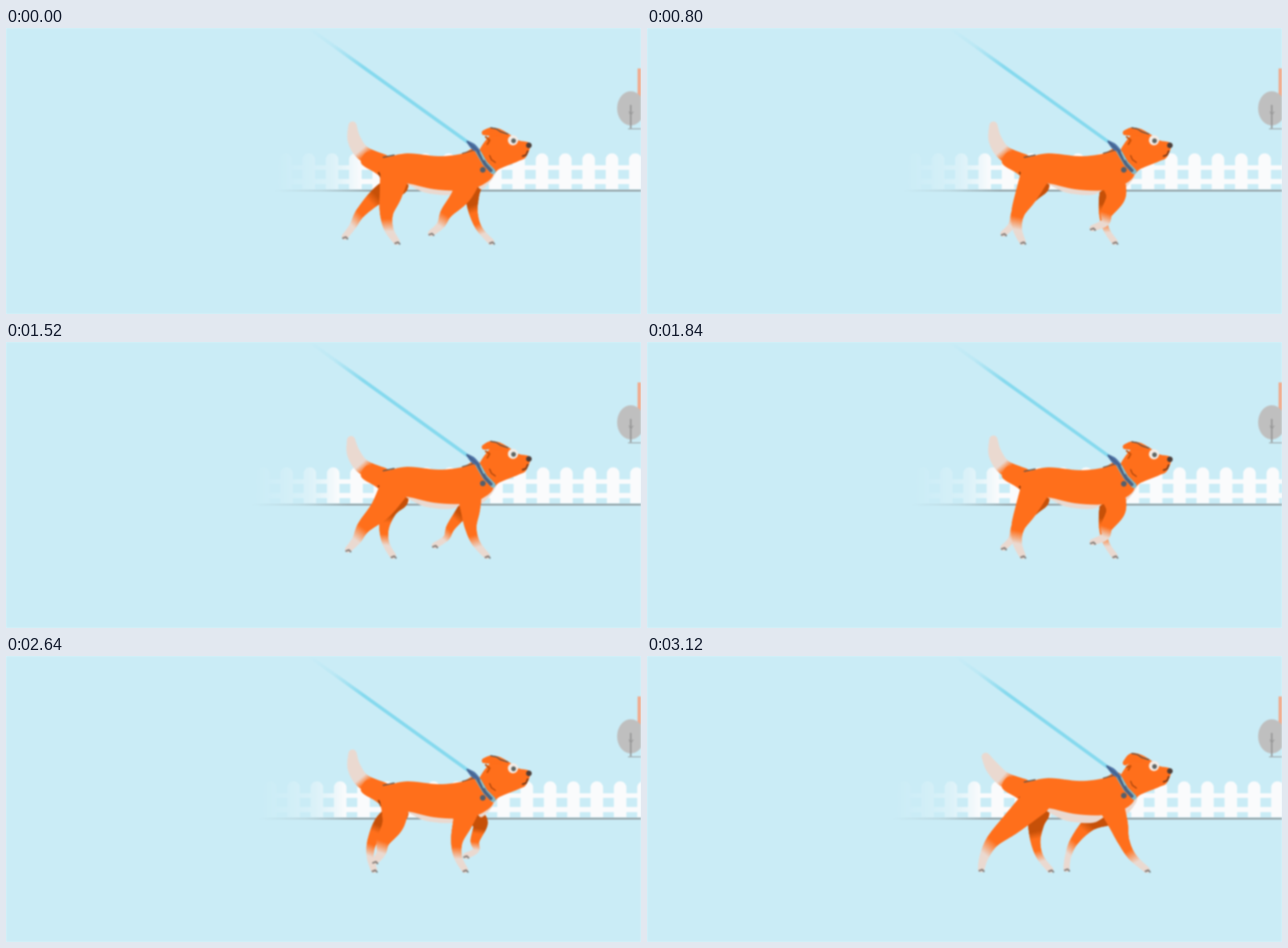
Write an HTML page with a canvas that moves like this. It is 1116 px wide and 502 px high and loops after 3.2 s.

```html
<!DOCTYPE html>
<html lang="en">
<head>
<meta charset="utf-8">
<title>Dog walk</title>
<style>
html, body { margin: 0; width: 100%; height: 100%; overflow: hidden; background: #e0f4fa; }
canvas { display: block; filter: blur(1.7px); }
</style>
</head>
<body>
<canvas id="stage" width="1116" height="502"></canvas>
<script>
const c = document.getElementById('stage').getContext('2d');
const ORANGE = '#ff6f1b', DARK = '#c65008', PALE = '#ead9d0', INK = '#5d5148';
const nearSkin = [[0, ORANGE], [.66, ORANGE], [.84, PALE], [1, PALE]];
const farSkin = [[0, DARK], [.3, DARK], [.43, ORANGE], [.63, ORANGE], [.82, PALE], [1, PALE]];

function fade(x0, y0, x1, y1, stops) {
  const g = c.createLinearGradient(x0, y0, x1, y1);
  for (const [at, colour] of stops) g.addColorStop(at, colour);
  return g;
}

// Closed smooth curve through points
function blob(p, fill) {
  const n = p.length / 2, at = i => [p[(i + n) % n * 2], p[(i + n) % n * 2 + 1]];
  c.beginPath();
  c.moveTo(p[0], p[1]);
  for (let i = 0; i < n; i++) {
    const [a, b, d, e] = [at(i - 1), at(i), at(i + 1), at(i + 2)];
    c.bezierCurveTo(b[0] + (d[0] - a[0]) / 6, b[1] + (d[1] - a[1]) / 6,
      d[0] - (e[0] - b[0]) / 6, d[1] - (e[1] - b[1]) / 6, d[0], d[1]);
  }
  c.fillStyle = fill;
  c.fill();
}

function oval(x, y, rx, ry, fill) {
  c.beginPath();
  c.ellipse(x, y, rx, ry, 0, 0, 7);
  c.fillStyle = fill;
  c.fill();
}

const disc = (x, y, r, fill) => oval(x, y, r, r, fill);

function line(colour, width, ...p) {
  c.beginPath();
  for (let i = 0; i < p.length; i += 2) c.lineTo(p[i], p[i + 1]);
  c.strokeStyle = colour;
  c.lineWidth = width;
  c.lineCap = c.lineJoin = 'round';
  c.stroke();
}

const spline = (a, b, d, e, u) =>
  b + u * (d - a + u * (2 * a - 5 * b + 4 * d - e + u * (3 * (b - d) + e - a))) / 2;

// Tapered limb along a smooth curve; joints are [x, y, width]
function limb(joints, fill) {
  const last = joints.length - 1;
  for (let i = 0; i < last; i++) {
    const near = [-1, 0, 1, 2].map(o => joints[Math.max(0, Math.min(last, i + o))]);
    for (let u = 0; u <= 1; u += .05) {
      const [x, y, w] = [0, 1, 2].map(j => spline(...near.map(q => q[j]), u));
      disc(x, y, w / 2, fill);
    }
  }
}

const hind = { x: 684, y: 254, reach: 717, stride: 250, lift: 15, width: 52 };
const fore = { x: 814, y: 258, reach: 888, stride: 290, lift: 25, width: 46 };

// The foot slides back on the ground for half the phase, then swings forward.
function leg(kind, phase, far) {
  const q = phase % 1, down = .52;
  const u = Math.max(0, (q - down) / (1 - down)), s = u ** 1.2;
  const swing = s * s * (3 - 2 * s);
  const lift = kind.lift * Math.sin(Math.PI * u);
  const footX = kind.reach - kind.stride * (u ? down * (1 - swing) : q);
  const footY = 376 - lift;
  const d = footX - kind.x, bend = lift * 1.25, w = kind.width * (far ? .75 : 1);
  const top = [kind.x + (far ? 4 : 0), kind.y + (far ? 21 : 0), w];
  limb([top,
    [kind.x + d * .35 - 9 + bend, 293, w * .74],
    [kind.x + d * .62 - 17 + bend, 324, w * .45],
    [kind.x + d * .81 - 14 + bend, 352 - lift * .45, w * .31],
    [footX, footY, 11]
  ], fade(top[0], top[1], footX, footY, far ? farSkin : nearSkin));
  line('rgba(85,80,78,.65)', 3, footX - 3, footY + 2, footX + 2, footY, footX + 5, footY + 3);
}

function fence(shift) {
  c.save();
  c.translate(-shift, 0);
  c.beginPath();
  for (let x = 491; x < 1180; x += 41) c.roundRect(x - 11, 220, 22, 63, [11, 11, 0, 0]);
  c.rect(472, 241, 720, 8);
  c.rect(472, 265, 720, 9);
  const white = a => `rgba(250,251,252,${a})`, grey = a => `rgba(145,158,162,${a})`;
  c.fillStyle = fade(474, 0, 624, 0, [[0, white(0)], [.37, white(.16)], [.64, white(.34)], [.84, white(.65)], [1, white(1)]]);
  c.fill();
  c.fillStyle = fade(470, 0, 640, 0, [[0, grey(0)], [.5, grey(.3)], [1, grey(1)]]);
  c.fillRect(470, 284, 720, 3);
  c.restore();
}

function scenery() {
  c.fillStyle = '#f1aa8c';
  c.fillRect(1110, 71, 10, 54);
  oval(1098, 141, 24, 30, '#bfbfbf');
  line('#929292', 2.5, 1098, 136, 1098, 176);
  line('#999', 1.5, 1095, 147, 1098, 153, 1102, 147);
  line('#a5b0b4', 2, 1094, 177, 1120, 177);
}

function torso() {
  blob([636,216, 662,226, 705,219, 760,224, 800,220, 830,210, 857,251,
    838,274, 800,284, 752,282, 706,272, 680,275, 650,254, 624,236], ORANGE);
  line(INK, 2, 663, 226, 672, 224, 682, 222);
  line('#8e3d0c', 3, 655, 253, 659, 262);
  line(INK, 1.8, 802, 219, 824, 213);
}

function face(earDrop) {
  blob([831,214, 849,186, 866,174, 884,182, 900,193, 921,199,
    914,222, 900,230, 868,243, 857,250, 838,236], ORANGE);
  limb([[866, 180, 14], [852, 178, 14], [840, 180 + earDrop, 8]], ORANGE);
  line(DARK, 3, 843, 187 + earDrop, 850, 193, 846, 200);
  line(INK, 2, 852, 171, 862, 173, 869, 178, 882, 182);
  disc(891, 193, 9, '#f3ece6');
  disc(892, 194, 4.2, '#5f6664');
  disc(919, 202, 5, '#4d3d38');
  line('#7b3a18', 3, 917, 212, 914, 219, 908, 221);
  line('#a5430c', 2, 850, 220, 853, 227, 860, 232);
  // collar and tag
  line('#7fb8c8', 9, 829, 212, 842, 234, 856, 248);
  line('#4d6280', 6, 829, 212, 842, 235, 852, 246);
  line('#8fd0dc', 2, 834, 214, 840, 227);
  disc(838, 245, 5, '#545f6c');
}

function shifted(dy, paint) {
  c.save();
  c.translate(0, dy);
  paint();
  c.restore();
}

// The body rises and the tail drops back around each near front step.
function dog(phase) {
  const rise = Math.max(0, Math.cos((phase + .04) * 2 * Math.PI)) ** 2;
  const lift = 1 - 7 * rise, nod = 4 - 5 * rise;
  const startX = 532 + 12 * rise, endX = 811 - 3 * rise, endY = 200 - 7 * rise;
  const leash = a => `rgba(133,217,238,${a})`;

  line(fade(startX, 0, 628, 68, [[0, leash(0)], [.45, leash(.2)], [1, leash(1)]]), 6, startX, 0, endX, endY);
  leg(hind, phase, true);
  leg(fore, phase + .5, true);

  const tipX = 609 - 17 * rise, tipY = 171 + 7 * rise;
  limb([[tipX, tipY, 14], [612 - 6 * rise, 196, 23], [628, 220 - 4 * rise, 26], [663, 236 - 7 * rise, 28]],
    fade(tipX, tipY, 663, 236, [[0, PALE], [.5, PALE], [.66, ORANGE], [1, ORANGE]]));
  blob([698,262, 724,284, 755,292, 790,291, 802,270], PALE);
  blob([860,249, 853,267, 834,283, 826,258], PALE);
  shifted(lift, torso);
  leg(hind, phase + .5);
  leg(fore, phase);
  shifted(nod, () => face(10 * rise));
  blob([endX - 2, endY - 2, endX + 13, endY + 4, 833, 213 + nod, 820, 210 + nod], '#4b70a4');
  line('#41577c', 1.5, endX, endY, 831, 213 + nod);
}

// Twelve drawings hold two strides, the first slower than the second.
const gait = i => .62 + .123 * i - .09 * Math.sin(Math.PI * i / 9);

function draw(now) {
  const t = Math.floor(now % 3200 / 80) * 80;
  c.fillStyle = '#caecf6';
  c.fillRect(0, 0, 1116, 502);
  fence(t % 1600 / 1600 * 41);
  scenery();
  dog(gait(Math.floor(t / 3200 * 36 + .8) % 12));
  requestAnimationFrame(draw);
}
draw(0);
</script>
</body>
</html>
```
